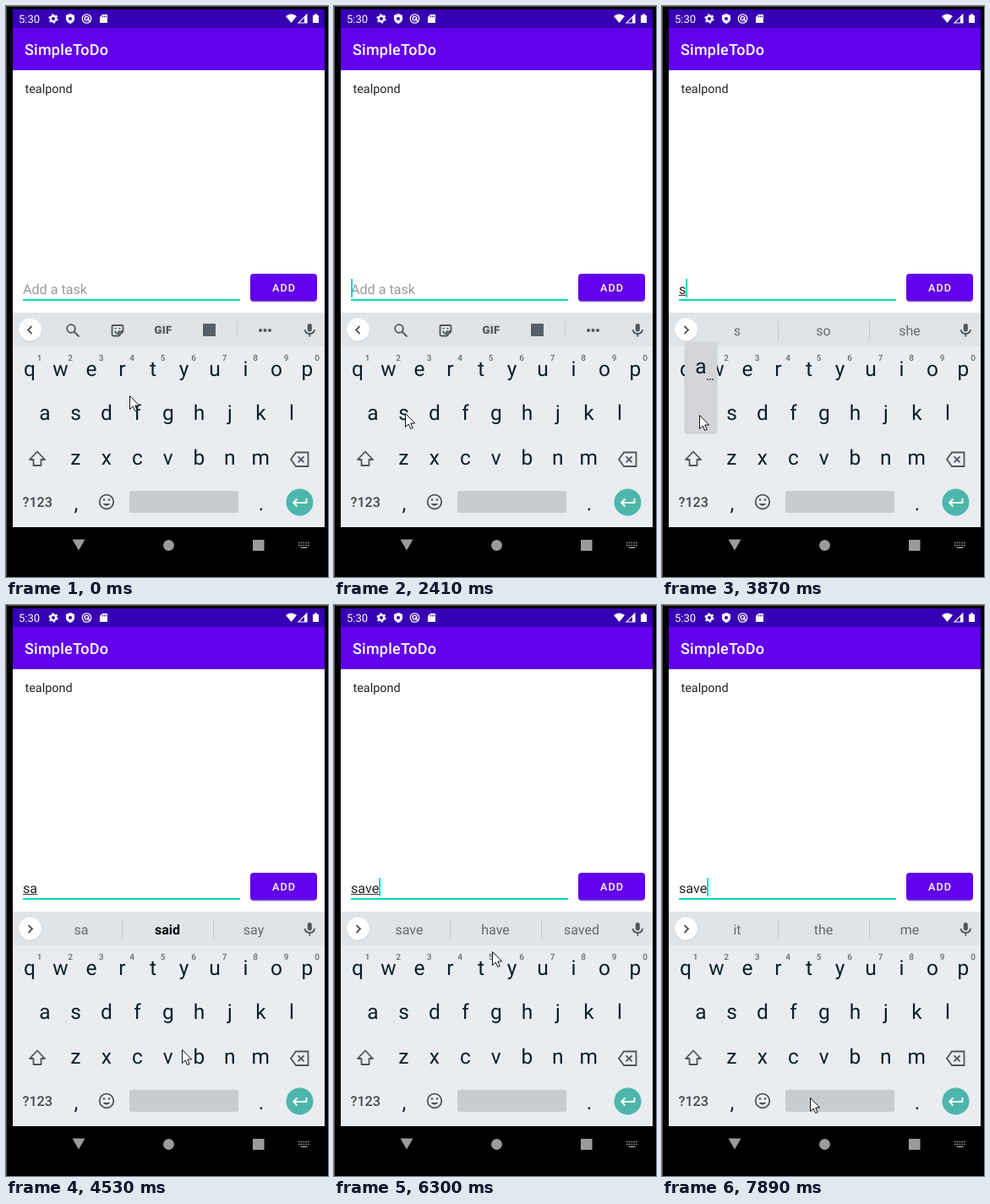
These frames come from a looping animation (381x676 px, 8000 ms). An HTML page:

```html
<!DOCTYPE html>
<html lang="en">
<head>
<meta charset="utf-8">
<title>To-do keyboard</title>
<style>
html, body { margin: 0; width: 100%; height: 100%; overflow: hidden; background: #000; }
svg { display: block; width: 381px; height: 676px; font-family: Roboto, sans-serif; text-rendering: geometricPrecision; white-space: pre; }
.mid { text-anchor: middle; }
.med { font-weight: 500; }
.key { font-size: 24.5px; fill: #0b1f29; text-anchor: middle; }
.num { font-size: 10px; font-weight: 500; fill: #626b71; text-anchor: middle; }
.line { fill: none; stroke: #4c565c; stroke-width: 1.8; }
.word { font-size: 16px; fill: #62696e; text-anchor: middle; }
.word.best { font-weight: 700; fill: #000; }
</style>
</head>
<body>
<svg viewBox="0 0 381 676">
  <rect width="381" height="676"/>
  <path d="M.5 676V.5H381" fill="none" stroke="#555"/>
  <rect x="8" y="4" width="369" height="22" fill="#3700b3"/>
  <rect x="8" y="26" width="369" height="50" fill="#6200ee"/>
  <rect x="8" y="76" width="369" height="288" fill="#fff"/>
  <rect x="8" y="363" width="369" height="40" fill="#e0e4e7"/>
  <rect x="8" y="403" width="369" height="214" fill="#e9edf1"/>

  <!-- status bar -->
  <g fill="#fff">
    <text x="15" y="20" font-size="13">5:30</text>
    <circle cx="56" cy="15" r="3.2" fill="none" stroke="#fff" stroke-width="2.4"/>
    <circle cx="56" cy="15" r="4.8" fill="none" stroke="#fff" stroke-width="1.6" stroke-dasharray="2.5 2.53"/>
    <path d="M76 9l5 2v4q0 4-5 6q-5-2-5-6v-4z"/>
    <circle cx="76" cy="15" r="2" fill="#3700b3"/>
    <circle cx="95.5" cy="15" r="5.2" fill="none" stroke="#fff" stroke-width="1.3"/>
    <circle cx="95.5" cy="14.7" r="2.4" fill="none" stroke="#fff" stroke-width="1.3"/>
    <path d="M96 15l4 4" stroke="#fff" stroke-width="1.3"/>
    <path d="M114 10h6v10h-9v-7z"/>
    <path d="M114.500 11.500v2M116.500 11.500v2M118.500 11.500v2" stroke="#3700b3"/>
    <path d="M331 12q6.500-5 13 0l-6.500 8z"/>
    <path d="M356 10v10h-10z" fill="none" stroke="#fff" stroke-width="1.1"/>
    <path d="M353 13l3-3v10h-3z"/>
    <path d="M363 11h2v-1.500h3v1.500h2v9h-7z"/>
  </g>

  <!-- app -->
  <text x="22" y="57.500" font-size="18" letter-spacing=".225" class="med" fill="#fff">SimpleToDo</text>
  <text x="22.500" y="103" font-size="14.400" fill="#222">tealpond</text>
  <rect x="289" y="318" width="79" height="33" rx="4" fill="#0003"/>
  <rect x="289" y="317" width="79" height="32.500" rx="4" fill="#6200ee"/>
  <text x="315" y="338" font-size="12.600" letter-spacing="1.120" class="med" fill="#fff">ADD</text>
  <rect x="20" y="347" width="257" height="2" fill="#03dac5"/>
  <text id="field" x="20" y="340.500" font-size="16.100"></text>
  <rect id="under" x="20" y="342" height="1" fill="#333"/>
  <rect id="caret" y="323" width="2" height="22" fill="#03dac5"/>

  <!-- toolbar -->
  <circle cx="28.500" cy="384" r="13.800" fill="#0002"/>
  <circle cx="28.500" cy="383.300" r="13.500" fill="#fff"/>
  <path id="chevron" class="line"/>
  <g id="tools">
    <circle cx="77" cy="382" r="4.800" class="line"/>
    <path d="M80.500 385.500l6 6" class="line" stroke-width="2"/>
    <path d="M127 378h10q1.500 0 1.500 1.500v6l-5 5h-6.500q-1.500 0-1.500-1.500v-9.500q0-1.500 1.500-1.500zM138 385.500h-4.500v4.500M128.500 385q2 3 4.500 2.500M129.500 381v1.500M134.500 381v1.500" class="line" stroke-width="1.600"/>
    <text x="186" y="388" font-size="13" font-weight="900" letter-spacing=".4" class="mid" fill="#4c565c">GIF</text>
    <rect x="233" y="376" width="15" height="15" rx="1" fill="#566066"/>
    <path d="M273.500 374v19" stroke="#c8cccf"/>
    <g fill="#4c565c"><circle cx="301" cy="384" r="2"/><circle cx="306.500" cy="384" r="2"/><circle cx="312" cy="384" r="2"/></g>
  </g>
  <g id="words">
    <path d="M137.500 373v22M245.500 373v22" stroke="#c3c8cb"/>
    <text class="word" x="89" y="389.500"></text>
    <text class="word" x="191" y="389.500"></text>
    <text class="word" x="293" y="389.500"></text>
  </g>
  <rect x="356.800" y="376" width="5" height="9.500" rx="2.500" fill="#4c565c"/>
  <path d="M353.800 383q0 5 5.500 5t5.500-5M359.300 388v3.500" class="line" stroke-width="1.500"/>

  <!-- keyboard -->
  <g id="keys"></g>
  <path d="M37 527.500l9 9.500h-4.500v7h-9v-7h-4.500z" class="line" stroke-linejoin="round"/>
  <path d="M343 528.500h14.500v16.500h-14.500l-6-8.250zM345.500 533.300l7 7M352.500 533.300l-7 7" class="line"/>
  <text x="19.500" y="593" font-size="16.200" class="med" fill="#3c484e">?123</text>
  <circle cx="119" cy="587" r="8.300" class="line"/>
  <path d="M114.500 589q4.500 5.500 9 0z" fill="#4c565c"/>
  <circle cx="116" cy="584.500" r="1.300" fill="#4c565c"/><circle cx="122" cy="584.500" r="1.300" fill="#4c565c"/>
  <rect x="146" y="574" width="129" height="26" rx="3" fill="#c8ccd0"/>
  <circle cx="347.500" cy="587.500" r="16" fill="#4db6ac"/>
  <path d="M355.500 583v5h-15M344.500 583.500l-4.500 4.500l4.500 4.500" fill="none" stroke="#fff" stroke-width="1.900"/>

  <!-- navigation -->
  <g fill="#9b9b9b">
    <path d="M78.500 631.500h15l-7.500 13z"/>
    <circle cx="192.500" cy="638.500" r="6.500"/>
    <rect x="292" y="632" width="13.500" height="13"/>
    <path d="M346 635.500h13M346 638.500h13" stroke="#9b9b9b" stroke-width="1.600" stroke-dasharray="1.600 1.200"/>
    <path d="M348.500 641.300h8" stroke="#9b9b9b" stroke-width="1.400"/>
  </g>

  <g id="popup">
    <rect x="-19.500" y="-83" width="39" height="108" rx="4" fill="#0002"/>
    <rect x="-19" y="-84" width="38" height="107.500" rx="4" fill="#d3d5d8"/>
    <text class="key" y="-47"></text>
    <path d="M7 -39.500h8" stroke="#222" stroke-width="1.400" stroke-dasharray="1.600 1.600"/>
  </g>
  <path id="mouse" d="M.5 .5v16l3.700-3.500l2.500 5.500l2.500-1l-2.500-5.500h5z" fill="#fff" stroke="#111"/>
</svg>
<script>
const $ = id => document.getElementById(id);
const LOOP = 8000;

// letter -> key centre
const keyAt = {};
let keyMarkup = "";
[["qwertyuiop", 28, 429], ["asdfghjkl", 46, 481.5], ["zxcvbnm", 82.3, 534.5]].forEach(([row, x0, y], r) => {
  [...row].forEach((c, i) => {
    const x = x0 + i * 36.5;
    keyAt[c] = [x, y];
    keyMarkup += `<text class="key" x="${x}" y="${y + 8.5}">${c}</text>`;
    if (!r) keyMarkup += `<text class="num" x="${x + 11.5}" y="419.5">${(i + 1) % 10}</text>`;
  });
});
keyMarkup += '<text class="key" x="83" y="597">,</text><text class="key" x="302" y="597">.</text>';
$("keys").innerHTML = keyMarkup;

// bursts of screen updates: first, last, count
const bursts = [[0, 0, 1], [120, 410, 3], [820, 820, 1], [1220, 2140, 8], [2290, 2530, 3], [2800, 2800, 1],
  [3200, 4130, 8], [4280, 5180, 8], [5340, 6300, 8], [6450, 7470, 9], [7590, 7890, 3]];

const path = [[0, 146, 461], [410, 121, 486], [1090, 121, 486], [1610, 112, 496], [2140, 88, 484], [2530, 82, 481],
  [3466, 82, 481], [3731, 44, 484], [4280, 44, 484], [4537, 208, 526], [4666, 195, 534], [5051, 195, 534],
  [5340, 91, 391], [5477, 93, 402], [5614, 97, 434], [5889, 97, 434], [6300, 187, 410], [6450, 187, 414],
  [7090, 168, 535], [7470, 172, 573], [7740, 175, 583], [8000, 175, 583]];

// time, field text, suggestions (* marks the best)
const typed = [[-720, "", ""], [3450, "s", "s so she"], [3980, "sa", "sa *said say"], [4910, "sav", "sav save saved"],
  [5870, "save", "save have saved"], [7730, "save ", "it the me"]];

const presses = [["s", 3190, 3460], ["a", 3850, 4270], ["v", 4780, 5040], ["e", 5600, 6020]];

const latest = (list, t) => list.filter(e => e[0] <= t).pop();

function snap(t) {
  const [a, b, n] = latest(bursts, t);
  if (n < 2) return a;
  const step = (b - a) / (n - 1);
  return a + step * Math.min(n - 1, Math.floor((t - a + 8) / step));
}

function mouseAt(t) {
  const i = path.findIndex(p => p[0] > t);
  const [t0, x0, y0] = path[i - 1], [t1, x1, y1] = path[i];
  const k = (t - t0) / (t1 - t0);
  return [Math.round(x0 + (x1 - x0) * k), Math.round(y0 + (y1 - y0) * k)];
}

const show = (el, on) => el.setAttribute("visibility", on ? "visible" : "hidden");
const move = (el, [x, y]) => el.setAttribute("transform", `translate(${x} ${y})`);
const field = $("field"), slots = [...$("words").querySelectorAll("text")];

function draw(t) {
  const [since, text, words] = latest(typed, t);
  field.textContent = text || "Add a task";
  field.setAttribute("fill", text ? "#222" : "#9a9a9a");
  const width = text ? field.getComputedTextLength() : 0;
  $("under").setAttribute("width", text.endsWith(" ") ? 0 : width);
  $("caret").setAttribute("x", Math.round(20 + width));
  show($("caret"), (t - since) % 1000 < 500);

  show($("tools"), !text);
  show($("words"), text);
  $("chevron").setAttribute("d", text ? "M26.500 379l4.500 4.500l-4.500 4.500" : "M30.500 379l-4.500 4.500l4.500 4.500");
  words.split(" ").forEach((w, i) => {
    slots[i].textContent = w.replace("*", "");
    slots[i].classList.toggle("best", w[0] === "*");
  });

  const press = presses.find(p => t >= p[1] && t < p[2]);
  show($("popup"), press);
  if (press) {
    move($("popup"), keyAt[press[0]]);
    $("popup").querySelector("text").textContent = press[0];
  }
  move($("mouse"), mouseAt(t));
}

const start = performance.now();
function tick() {
  draw(snap((performance.now() - start) % LOOP));
  requestAnimationFrame(tick);
}
tick();
</script>
</body>
</html>
```
